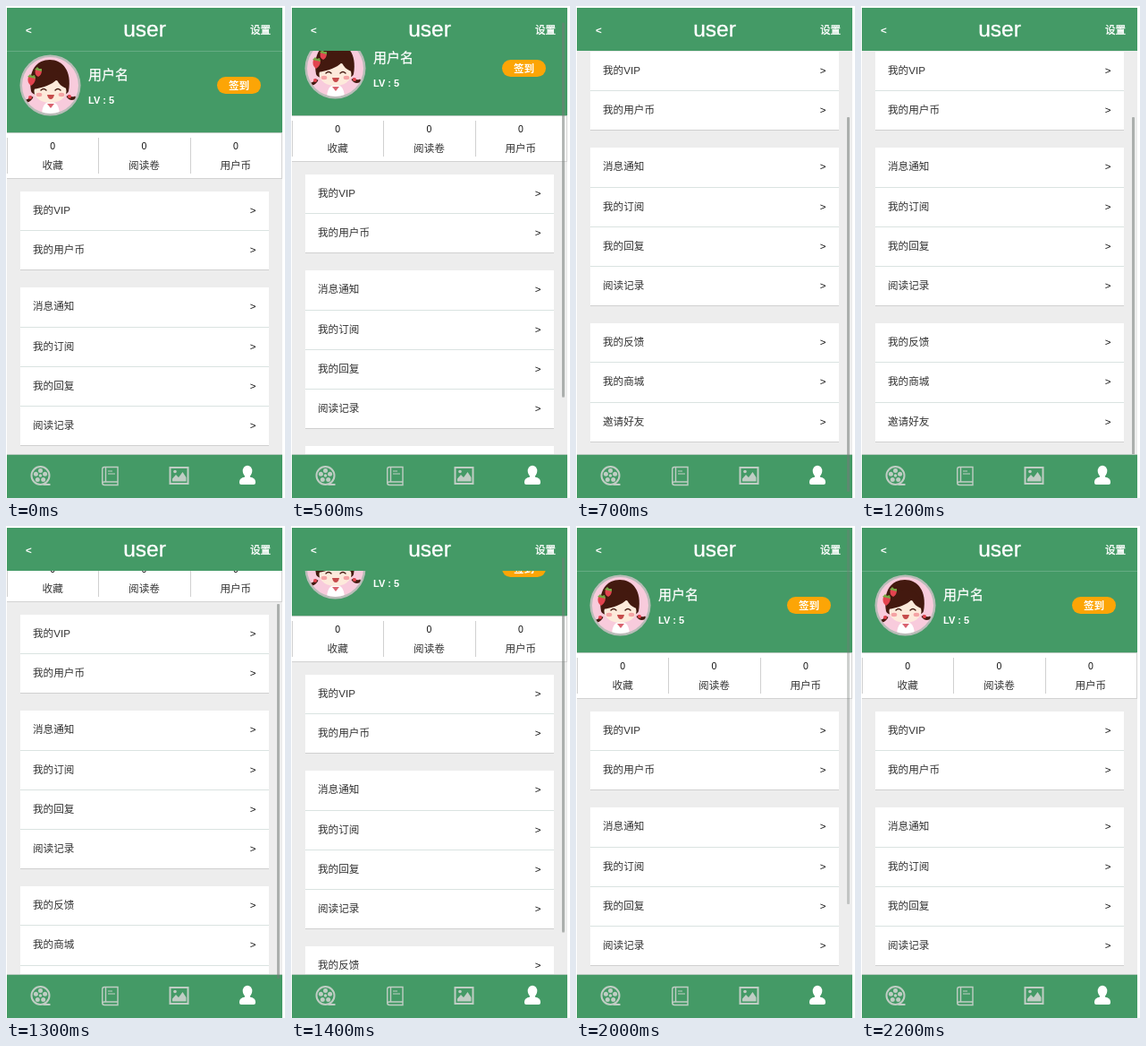
An HTML page that plays this animation: 312x549 px, repeating every 2.6 s.

```html
<!DOCTYPE html>
<html lang="zh-CN">
<head>
<meta charset="utf-8">
<title>user</title>
<style>
  html, body { margin: 0; width: 100%; height: 100%; overflow: hidden; background: #fff; }
  body {
    position: relative; color: #333;
    font: 11.6px "Liberation Sans", "Noto Sans CJK SC", "Noto Sans CJK", sans-serif;
  }
  .app { position: absolute; left: 1px; top: 2px; width: 308px; height: 547px; overflow: hidden; background: #ededed; }
  .bar { position: absolute; left: 0; width: 100%; background: #449a66; color: #fff; }
  .top { top: 0; height: 48px; -webkit-text-stroke: .35px #fff; }
  .top span { position: absolute; top: 0; line-height: 50px; white-space: nowrap; }
  .top h1 { margin: 0; font-size: 24.5px; font-weight: 400; line-height: 47px; text-align: center; }
  .tabs { top: 498px; height: 48px; border-top: 1px solid #b5c9bd; }
  .tabs svg { position: absolute; left: 0; top: 0; }

  .page { position: absolute; left: 0; top: 48px; width: 308px; animation: scroll 2.6s step-end infinite; }
  .profile { position: relative; height: 90px; border-top: 1px solid #64ab82; background: #449a66; color: #fff; }
  .profile > * { position: absolute; white-space: nowrap; }
  .avatar { left: 14px; top: 3px; }
  .name { left: 91px; top: 15px; font-size: 15px; line-height: 21px; -webkit-text-stroke: .25px #fff; }
  .level { left: 91px; top: 44px; font-size: 11px; font-weight: 700; line-height: 20px; }
  .sign { left: 235px; top: 28px; width: 49px; height: 19px; border-radius: 10px; background: #fca506;
    font-weight: 700; line-height: 20px; text-align: center; }

  .stats { display: flex; box-sizing: border-box; height: 52px; background: #fff;
    border: solid #d2d2d2; border-width: 1px 1px 1px 0; border-top-color: #b9c9bf; }
  .stats div { position: relative; width: 102.4px; text-align: center; line-height: 21px; padding-top: 4px; }
  .stats div::before { content: ""; position: absolute; left: 0; top: 5px; width: 1px; height: 40px; background: #d0d0d0; }
  .stats b { display: block; font-size: 10.5px; font-weight: 400; color: #111; }

  .card { margin: 14px 0 0 15px; width: 278px; background: #fff; }
  .card + .card { margin-top: 19px; }
  .row { display: flex; justify-content: space-between; box-sizing: border-box; height: 44.2px;
    padding: 0 14.5px 0 14px; line-height: 42px; border-bottom: 1px solid #dae3e1; }
  .row:last-child { border-color: #d0d0d0; }
  .row::after { content: ">"; color: #111; }

  .thumb { position: absolute; left: 302px; top: 2px; width: 3px; height: 418px; border-radius: 1px;
    background: rgba(118, 124, 121, .55); opacity: 0;
    animation: slide 2.6s step-end infinite, fade 2.6s step-end infinite; }

  @keyframes scroll {
    0% { transform: translateY(0); }
    19.2308% { transform: translateY(-19px); }
    23.0769% { transform: translateY(-98px); }
    26.9231% { transform: translateY(-156px); }
    50% { transform: translateY(-108px); }
    53.8462% { transform: translateY(-41px); }
    57.6923%, 100% { transform: translateY(0); }
  }
  @keyframes slide {
    0% { transform: translateY(0); }
    19.2308% { transform: translateY(14.6px); }
    23.0769% { transform: translateY(75.4px); }
    26.9231% { transform: translateY(120px); }
    46.1538% { transform: translateY(120px); clip-path: inset(0 0 42px 0); }
    50% { transform: translateY(83px); clip-path: none; }
    53.8462% { transform: translateY(31.5px); }
    57.6923%, 100% { transform: translateY(0); }
  }
  @keyframes fade {
    0% { opacity: 0; }
    19.2308% { opacity: 1; }
    76.9231% { opacity: .66; }
    80.7692% { opacity: .33; }
    84.6154%, 100% { opacity: 0; }
  }
</style>
</head>
<body>
<div class="app">
  <div class="page">
    <div class="profile">
      <svg class="avatar" width="70" height="70" viewBox="0 0 70 70">
        <clipPath id="disc"><circle cx="34.5" cy="34.5" r="31.5"/></clipPath>
        <circle cx="34.5" cy="34.5" r="34" fill="#b9bcb8"/>
        <g clip-path="url(#disc)">
          <path d="M0 0h70v70H0z" fill="#f8cbdc"/>
          <path d="M14 47q-3 6-9 5M54 46q3 5 9 2" fill="none" stroke="#43190f" stroke-width="3.500"/>
          <path d="M13 41C9 17 20 6 34 6s25 12 21 35c-2 8-40 8-42 0z" fill="#43190f"/>
          <path d="M25 70c0-12 3-17 10-17s10 5 10 17z" fill="#fff"/>
          <path d="M31 55h8l-4 5z" fill="#d9636f"/>
          <ellipse cx="34.500" cy="41" rx="18" ry="13" fill="#fdeadb"/>
          <path d="M15 39C16 23 26 17 35 17s18 6 18 21c-6-2-9-5-11-10-6 6-15 9-27 11z" fill="#43190f"/>
          <g fill="#f5a3a4">
            <ellipse cx="22" cy="45" rx="3.300" ry="2.200"/>
            <ellipse cx="47" cy="45" rx="3.300" ry="2.200"/>
          </g>
          <g fill="none" stroke="#43190f" stroke-width="1.300" stroke-linecap="round">
            <path d="M24 40q3-3 6 0M40 40q3-3 6 0"/>
          </g>
          <path d="M31 45h8q-1 5-4 5t-4-5z" fill="#c64b4b"/>
          <g fill="#e3434f">
            <path d="M10 25q5-3 8 1q0 6-5 9q-5-4-3-10z"/>
            <path d="M18 17q4-2 7 1q0 5-4 7q-5-3-3-8z"/>
          </g>
          <path d="M9 25l3-3 2 2 3-1 1 4zM17 17l3-3 2 2 3 0v3z" fill="#77a944"/>
          <circle cx="12" cy="48" r="2" fill="#e3434f"/>
          <circle cx="56" cy="47" r="2" fill="#e3434f"/>
        </g>
      </svg>
      <span class="name">用户名</span>
      <span class="level">LV : 5</span>
      <span class="sign">签到</span>
    </div>
    <div class="stats">
      <div><b>0</b>收藏</div>
      <div><b>0</b>阅读卷</div>
      <div><b>0</b>用户币</div>
    </div>
    <div class="card">
      <div class="row">我的VIP</div>
      <div class="row">我的用户币</div>
    </div>
    <div class="card">
      <div class="row">消息通知</div>
      <div class="row">我的订阅</div>
      <div class="row">我的回复</div>
      <div class="row">阅读记录</div>
    </div>
    <div class="card">
      <div class="row">我的反馈</div>
      <div class="row">我的商城</div>
      <div class="row">邀请好友</div>
    </div>
  </div>

  <div class="bar top">
    <span style="left:21px;font-weight:700;-webkit-text-stroke:0">&lt;</span>
    <h1>user</h1>
    <span style="left:272px">设置</span>
  </div>

  <div class="bar tabs">
    <svg width="308" height="48" fill="none" stroke="#c0cdc4" stroke-width="2">
      <g transform="translate(37.500 23)">
        <circle r="10"/>
        <g fill="#c0cdc4" stroke="none">
          <circle r="1.800"/>
          <circle cy="-5.400" r="2.500"/>
          <circle cx="5.100" cy="-1.700" r="2.500"/>
          <circle cx="3.200" cy="4.400" r="2.500"/>
          <circle cx="-3.200" cy="4.400" r="2.500"/>
          <circle cx="-5.100" cy="-1.700" r="2.500"/>
        </g>
        <path d="M3 10h8"/>
      </g>
      <path d="M124 30V13.500H109q-2.300 0-2.300 2.300V31q0 2.500 2.500 2.500H124V30H109q-2.300 0-2.300 2M110.500 14v15.500" stroke-width="1.400"/>
      <path d="M113 18h5M113 21h8" stroke-width="1.200"/>
      <path d="M182.500 14h20v18h-20z"/>
      <path d="M185 29.500v-3l4-4.500 3 3 4.500-6 4 6v4.500z" fill="#c0cdc4" stroke="none"/>
      <circle cx="188" cy="18.500" r="1.800" fill="#c0cdc4" stroke="none"/>
      <g fill="#fff" stroke="none">
        <ellipse cx="269" cy="18" rx="5.300" ry="6.200"/>
        <path d="M266 21h6v3.500c4 1 6 2.500 6 6V31q0 2-2 2h-14q-2 0-2-2v-.5c0-3.500 2-5 6-6z"/>
      </g>
    </svg>
  </div>
  <div class="thumb"></div>
</div>
</body>
</html>
```
